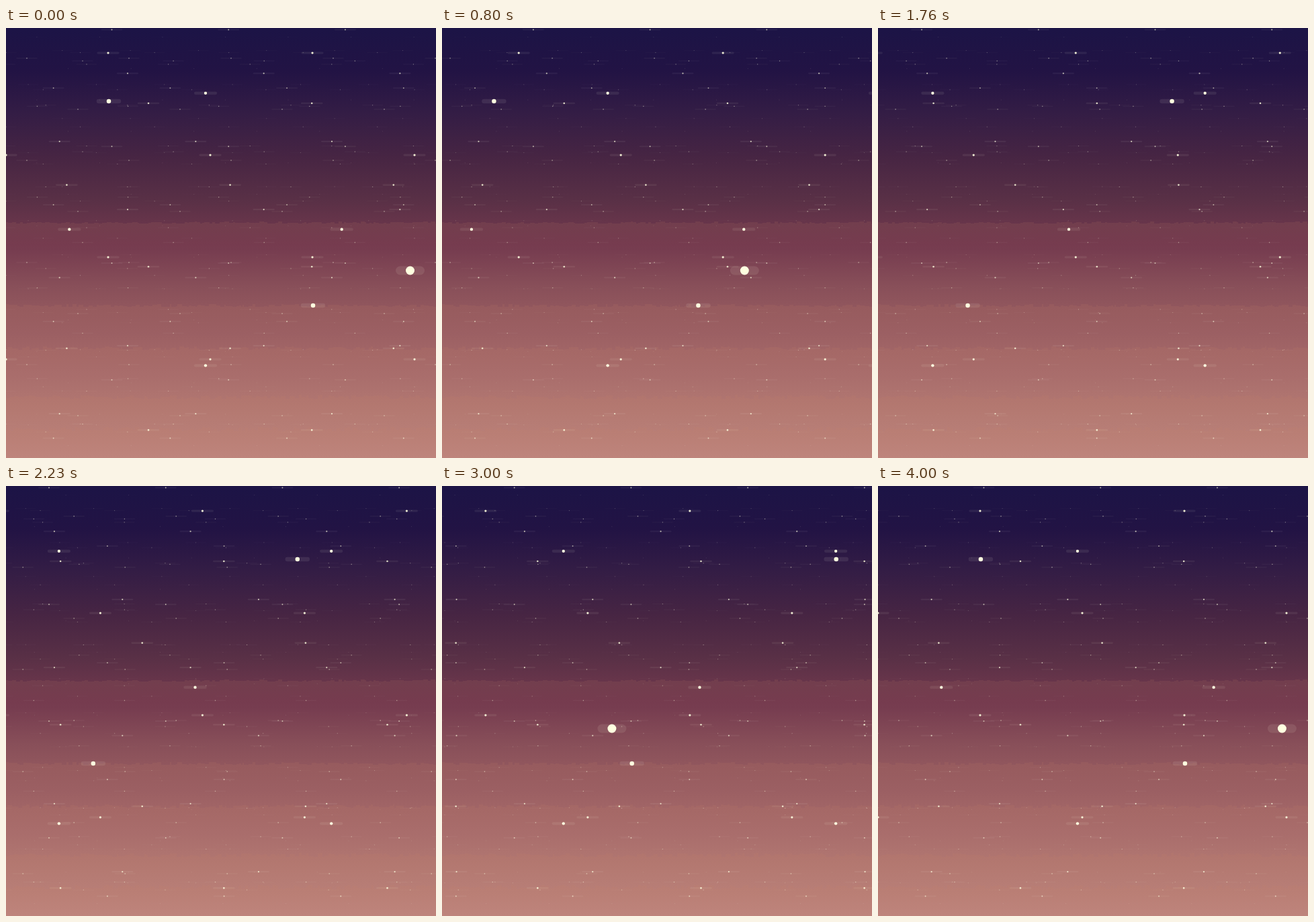
Recreate the animation shown at these times as an HTML page with a canvas. Size 640 by 640 pixels, loop 4.03 s.

```html
<!DOCTYPE html>
<html lang="en">
<head>
<meta charset="utf-8">
<title>Drifting stars</title>
<style>
  html, body { margin: 0; width: 100%; height: 100%; overflow: hidden; background: #1c1446; }
  canvas { position: absolute; left: 0; top: 0; width: 640px; height: 640px; display: block; }
</style>
</head>
<body>
<canvas id="sky" width="640" height="640"></canvas>
<canvas id="stars" width="640" height="640"></canvas>
<script>
const SIZE = 640, LOOP = 4030, STEP = 100 / 3, TILE = 1216, LAYERS = 13;

// Evenly spaced from top to bottom.
const SKY = ['#1c1446', '#221344', '#341d45', '#472543', '#593046', '#73394e',
             '#884f59', '#9a5e62', '#a86c6b', '#b47a73', '#be847c'];
const EDGES = [291, 415, 479, 552, 600];

// One star of each near layer; layer n is n times farther away.
const ANCHORS = [[601.5, 361], [153, 109], [297, 97], [152, 37], [212, 112],
                 [181, 67.5], [157.5, 2.5], [31, 45], [114, 49], [120, 54]];

let seed = 7;
const random = () => (seed = seed * 16807 % 2147483647) / 2147483647;

// The faint far layers may lie anywhere.
while (ANCHORS.length < LAYERS) ANCHORS.push([random() * SIZE, random() * SIZE]);

function paintSky() {
  const c = document.getElementById('sky').getContext('2d');
  const base = c.createLinearGradient(0, 0, 0, SIZE);
  SKY.forEach((color, i) => base.addColorStop(i / (SKY.length - 1), color));
  c.fillStyle = base;
  c.fillRect(0, 0, SIZE, SIZE);

  // Ragged band edges, rougher towards the horizon.
  for (const y of EDGES) {
    const glow = c.createLinearGradient(0, y, 0, y + 40);
    glow.addColorStop(0, 'rgba(196, 128, 100, 0.12)');
    glow.addColorStop(1, 'rgba(196, 128, 100, 0)');
    c.fillStyle = glow;
    for (let x = 0, w; x < SIZE; x += w) {
      w = 2 + Math.floor(random() * 6);
      const h = Math.floor(random() * y / 90);
      c.fillRect(x, y - h, w, h + 40);
    }
  }
}

// Distance of the nearest layer: out to the left and back, eased at both ends.
function drift(t) {
  const u = Math.max(0, (2001 - Math.abs(t - 2044)) / 2040);
  const a = u ** 2.3, b = (1 - u) ** 2.3;
  return 660 * a / (a + b);
}

const ctx = document.getElementById('stars').getContext('2d');

function star(x, y, n) {
  const r = 6.5 / n, half = 15 + r;
  ctx.fillStyle = `rgba(255, 255, 224, ${0.1 * (1 - n / 14)})`;
  ctx.beginPath();
  ctx.roundRect(x - half, y - r, 2 * half, 2 * r, r);
  ctx.fill();
  ctx.fillStyle = `rgba(255, 255, 224, ${Math.min(1, 1.25 - n / 12)})`;
  ctx.beginPath();
  ctx.arc(x, y, r, 0, 2 * Math.PI);
  ctx.fill();
}

function draw(time) {
  const t = Math.floor((time % LOOP + 7) / STEP) * STEP;
  const shift = drift(t);
  ctx.clearRect(0, 0, SIZE, SIZE);
  for (let n = LAYERS; n > 0; n--) {
    const [x0, y0] = ANCHORS[n - 1], tile = TILE / n, row = tile / 2;
    // Every other row is moved by half a tile.
    for (let k = -Math.ceil(y0 / row); y0 + k * row < SIZE + 8; k++) {
      const x = x0 - shift / n + k * row;
      const start = ((x + 30) % tile + tile) % tile - 30;
      for (let sx = start; sx < SIZE + 30; sx += tile) star(sx, y0 + k * row, n);
    }
  }
}

const begin = performance.now();
function tick() {
  draw(performance.now() - begin);
  requestAnimationFrame(tick);
}
paintSky();
tick();
</script>
</body>
</html>
```
